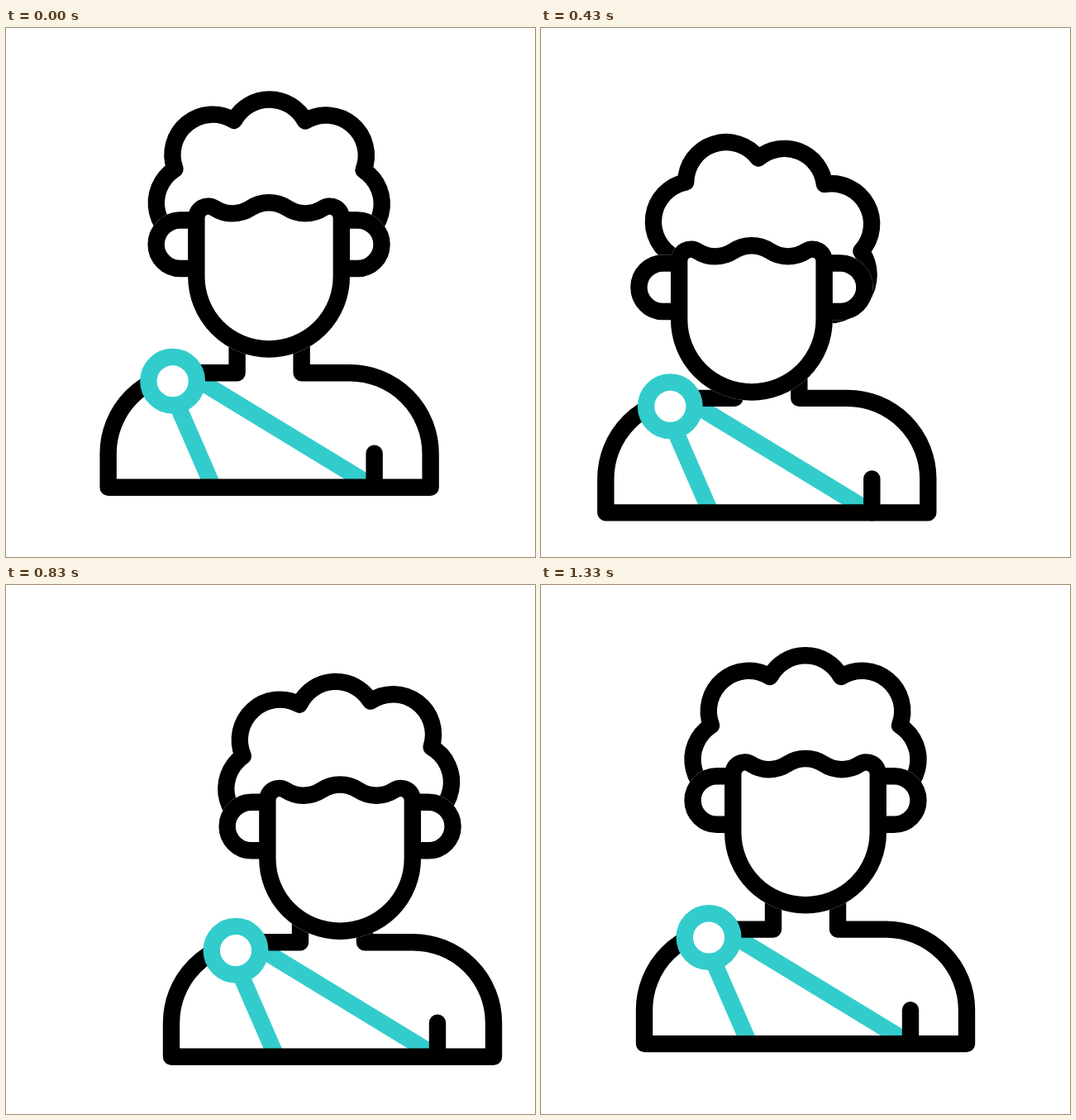
These frames come from a looping animation (640x640 px, 1.67 s). An HTML page with a canvas:

```html
<!DOCTYPE html>
<html lang="en">
<head>
<meta charset="utf-8">
<title>Swaying figure</title>
<style>
  html, body { margin: 0; width: 100%; height: 100%; overflow: hidden; background: #fff; }
  canvas { display: block; width: 100vw; height: 100vh; }
</style>
</head>
<body>
<canvas id="stage" width="640" height="640"></canvas>
<script>
const ctx = document.getElementById('stage').getContext('2d');
const LOOP = 1670, FPS = 30, LAST = 49, REST = 40;
const INK = '#000', TEAL = '#33cccc', LINE = 20.4;

// Smooth curve through the keys, at rest at both ends.
function spline(frames, values) {
  const n = frames.length - 1;
  const h = i => frames[i + 1] - frames[i];
  const rise = i => (values[i + 1] - values[i]) / h(i);
  const slope = new Array(n + 1).fill(0);
  for (let pass = 0; pass < 60; pass++) {
    for (let i = 1; i < n; i++) {
      const a = 1 / h(i - 1), b = 1 / h(i);
      slope[i] = (3 * (rise(i - 1) * a + rise(i) * b) - a * slope[i - 1] - b * slope[i + 1]) / (2 * (a + b));
    }
  }
  return f => {
    if (f <= frames[0] || f >= frames[n]) return 0;
    let i = 0;
    while (f > frames[i + 1]) i++;
    const u = (f - frames[i]) / h(i), v = 1 - u;
    return values[i] * (1 + 2 * u) * v * v + values[i + 1] * (3 - 2 * u) * u * u
      + h(i) * (slope[i] * u * v * v - slope[i + 1] * u * u * v);
  };
}

const KEYS = [-1.2, 5, 13, 18, 25, 31, REST];
const bodyX = spline([-1.2, 5, 11, 13, 16, 18, 25, 31, REST], [0, -26.2, -51.6, -46.7, -24.7, -6, 75, 58.7, 0]);
const bodyY = spline(KEYS, [0, 13.1, 31.3, 28, 15.6, 7.8, 0]);
const headX = spline(KEYS, [0, -9.8, -18.4, -9.2, 9.1, 11.2, 0]);
const headY = spline(KEYS, [0, 9.6, 21.9, 21.3, 15.9, 10.3, 0]);
const hairTurn = spline(KEYS, [0, 7.8, 21.5, 15, -2.7, -4.8, 0]);

const HAIR_PIVOT = 242;
const hair = new Path2D(
  'M227.8 259.6 A48.75 48.75 0 0 1 206 170 A48.75 48.75 0 0 1 277 111' +
  'A48.75 48.75 0 0 1 363 111 A48.75 48.75 0 0 1 434 170 A48.75 48.75 0 0 1 412.2 259.6');
const face = new Path2D(
  'M232.25 299.5 V228.7 A14.2 14.2 0 0 1 254 216.6 A40 40 0 0 0 298 216.6 A40 40 0 0 1 342 216.6' +
  'A40 40 0 0 0 386 216.6 A14.2 14.2 0 0 1 407.75 228.7 V299.5 A87.75 87.75 0 0 1 232.25 299.5 Z');
const ears = new Path2D(
  'M232.25 231.3 H212.75 A29.25 29.25 0 0 0 212.75 289.8 H232.25' +
  'M407.75 231.3 H427.25 A29.25 29.25 0 0 1 427.25 289.8 H407.75');
const torso = new Path2D(
  'M281 365 V416.6 H222.5 A97.5 97.5 0 0 0 125 514.1 V555.1 H515 V514.1' +
  'A97.5 97.5 0 0 0 417.5 416.6 H359 V365');
const arm = new Path2D('M447 514.1 V555.1');
const sash = new Path2D('M208.5 455 L252 555 M232 424 L447 555');
const brooch = new Path2D();
brooch.arc(203, 426.5, 29.25, 0, 2 * Math.PI);

function draw(path, color, cap = 'round') {
  ctx.strokeStyle = color;
  ctx.lineCap = cap;
  ctx.stroke(path);
}

function matte(path) {
  ctx.fillStyle = '#fff';
  ctx.fill(path);
  draw(path, '#fff', 'butt');
}

function drawHair(angle) {
  ctx.save();
  ctx.translate(320, HAIR_PIVOT);
  ctx.rotate(angle * Math.PI / 180);
  ctx.translate(-320, -HAIR_PIVOT);
  draw(hair, INK);
  ctx.restore();
}

function drawBody() {
  draw(sash, TEAL, 'butt');
  draw(torso, INK);
  draw(arm, INK);
  ctx.fillStyle = '#fff';
  ctx.fill(brooch);
  draw(brooch, TEAL);
}

function drawHead() {
  matte(ears);
  matte(face);
  draw(ears, INK, 'butt');
  draw(face, INK);
}

function render(ms) {
  const frame = Math.min(LAST, Math.floor((ms % LOOP + 4) * FPS / 1000));
  ctx.fillStyle = '#fff';
  ctx.fillRect(0, 0, 640, 640);
  ctx.lineWidth = LINE;
  ctx.lineJoin = 'round';
  ctx.save();
  ctx.translate(bodyX(frame), bodyY(frame));
  drawBody();
  ctx.translate(headX(frame), headY(frame));
  drawHair(hairTurn(frame));
  drawHead();
  ctx.restore();
}

let start;
function tick(now) {
  if (start === undefined) start = now;
  render(now - start);
  requestAnimationFrame(tick);
}
render(0);
requestAnimationFrame(tick);
</script>
</body>
</html>
```
